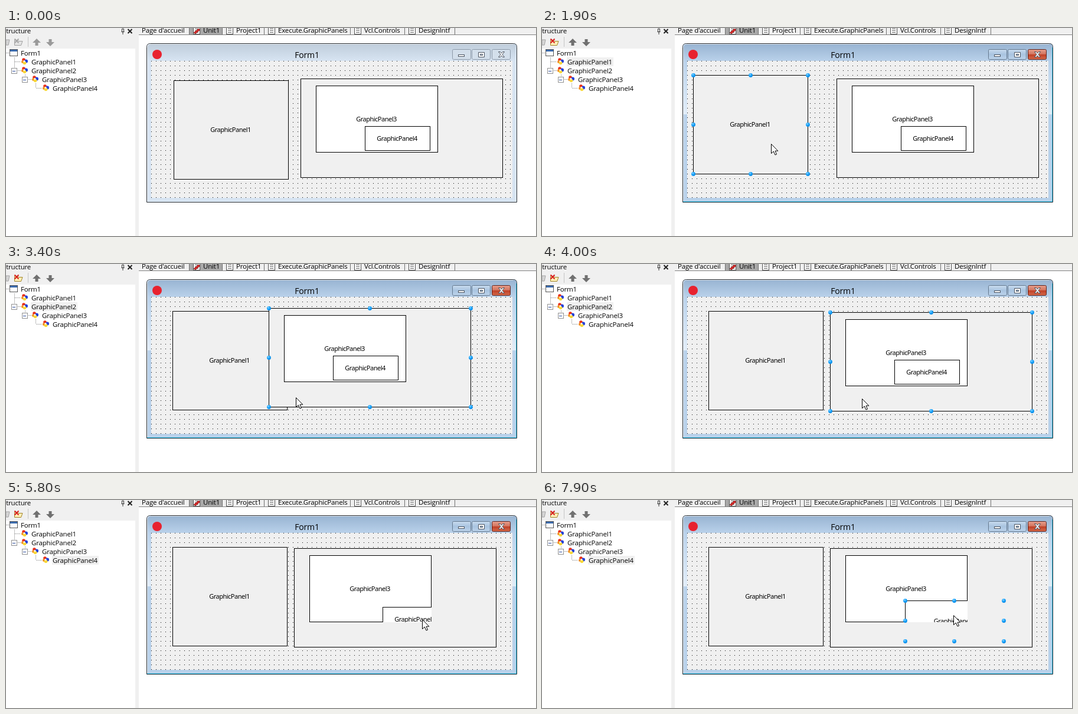
Animation, 898 px wide and 354 px high, one loop 8000 ms. Source, as an HTML page:

```html
<!DOCTYPE html>
<html lang="fr">
<head>
<meta charset="utf-8">
<title>Form designer</title>
<style>
  html, body { margin: 0; width: 100%; height: 100%; overflow: hidden; background: #fff; }
  #stage { display: block; width: 898px; height: 354px; }
  text { font: 11.5px "Open Sans", "Noto Sans", sans-serif; letter-spacing: -.17px; fill: #000; }
  .label { font: 11px "Noto Sans", "Open Sans", sans-serif; letter-spacing: -.5px; text-anchor: middle; }
  .title { font-size: 14px; letter-spacing: -.2px; text-anchor: middle; }
  .crisp { shape-rendering: crispEdges; }
  .tree { stroke: #808080; stroke-dasharray: 1 1; fill: none; }
</style>
</head>
<body>
<svg id="stage" viewBox="0 0 898 354" xmlns="http://www.w3.org/2000/svg">
  <defs>
    <linearGradient id="active" x2="0" y2="1">
      <stop offset="0" stop-color="#98b4d2"/><stop offset="1" stop-color="#b9d1ea"/>
    </linearGradient>
    <linearGradient id="idle" x2="0" y2="1">
      <stop offset="0" stop-color="#bfcddb"/><stop offset="1" stop-color="#d7e4f2"/>
    </linearGradient>
    <linearGradient id="side" x2="0" y2="1">
      <stop offset="0" stop-color="#b9d1ea"/><stop offset="1" stop-color="#e2edf8"/>
    </linearGradient>
    <linearGradient id="red" x2="0" y2="1">
      <stop offset="0" stop-color="#e8a08e"/><stop offset=".48" stop-color="#d2735d"/>
      <stop offset=".5" stop-color="#bf3f26"/><stop offset="1" stop-color="#d4694a"/>
    </linearGradient>
    <linearGradient id="blue" x2="0" y2="1">
      <stop offset="0" stop-color="#c9dcef"/><stop offset=".5" stop-color="#a9c4e0"/>
      <stop offset="1" stop-color="#bdd4ec"/>
    </linearGradient>
    <radialGradient id="ball" cx=".38" cy=".32" r=".75">
      <stop offset="0" stop-color="#8fd6ff"/><stop offset=".45" stop-color="#18a3fb"/>
      <stop offset="1" stop-color="#0584e0"/>
    </radialGradient>
    <g id="part">
      <circle cx="5" cy="3" r="2.8" fill="#e8301c"/>
      <circle cx="9" cy="5.500" r="3" fill="#2440d8"/>
      <circle cx="3.500" cy="6.500" r="2.500" fill="#f09028"/>
      <circle cx="6.500" cy="8.500" r="2.800" fill="#f8d838"/>
      <circle cx="6" cy="5.500" r="1.600" fill="#fff"/>
    </g>
    <g id="doc" class="crisp">
      <rect x=".5" y="-2.500" width="11" height="13" fill="#fff" stroke="#505050"/>
      <path d="M3 1.500h6M3 4.500h6M3 7.500h6" stroke="#606060"/>
    </g>
    <g id="plus" class="crisp">
      <rect x="-4.500" y="-4.500" width="9" height="9" fill="#fff" stroke="#919191"/>
      <path d="M-2.500 .5h5" stroke="#3050a0"/>
    </g>
  </defs>

  <!-- structure pane -->
  <g class="crisp" fill="#f0f0f0">
    <rect width="219" height="35"/>
    <rect x="219" width="6" height="354"/>
    <rect x="37" y="15" width="1" height="17" fill="#c4c4c4"/>
  </g>
  <text x="-6" y="9">Structure</text>
  <path d="M195.500 6.500h5M198 7v4M196.500 6V1.500h3V6" fill="none" stroke="#303030"/>
  <path d="M206.500 2l7 7m0-7l-7 7" stroke="#202020" stroke-width="2"/>
  <path d="M0 20h6l-2 9H0z" fill="#d6d6d6" stroke="#a2a2a2"/>
  <path id="folder" d="M14.500 20.500h5l1.500 2h7l-2.500 7h-11z"/>
  <path id="cross" d="M14.500 18.500l7 7m0-7l-7 7" stroke-width="2"/>
  <g id="arrows">
    <path d="M52 18l7 7h-4.500v5h-5v-5H45z"/>
    <path d="M75 31l7-7h-4.500v-5h-5v5H68z"/>
  </g>
  <rect id="mark" height="15" fill="#f0f0f0"/>
  <g class="crisp">
    <path class="tree" d="M0 42.500h6M14.500 50v22M15 57.500h10M18 72.500h7M32.500 79v8M36 87.500h7M50.500 94v8M51 102.500h10"/>
    <use href="#plus" x="13.500" y="72.500"/>
    <use href="#plus" x="31.500" y="87.500"/>
    <rect x="6.500" y="36.500" width="13" height="11" fill="#fff" stroke="#555"/>
    <rect x="7" y="37" width="12" height="3" fill="#3c6cae"/>
  </g>
  <g id="nodes"></g>

  <!-- editor tabs -->
  <g class="crisp">
    <rect x="225" width="673" height="11" fill="#f0f0f0"/>
    <rect x="311" width="55" height="11" fill="#a8a8a8"/>
    <rect x="225" y="11" width="673" height="1" fill="#808080"/>
  </g>
  <g id="tabs"></g>
  <path d="M318 8l8-7 3 2-8 7z" fill="#d02828" stroke="#701010" stroke-width=".6"/>

  <!-- form window -->
  <path id="frame" d="M238.500 296.500V32.500q0-6 6-6h615q6 0 6 6v264z" stroke="#22282e"/>
  <path id="top" d="M239 56V32.500q0-5.500 5.500-5.500h615q5.500 0 5.500 5.500V56z"/>
  <path id="sides" d="M239 56h7v91h-7zM858 56h7v91h-7z" fill="url(#side)"/>
  <path d="M239.500 295V32.500q0-5 5-5h615" fill="none" stroke="#fff" stroke-opacity=".75"/>
  <path id="glow" d="M864.500 33v262.500H239" fill="none"/>
  <circle cx="256" cy="45" r="8" fill="#e8222f"/>
  <text class="title" x="510" y="51">Form1</text>
  <g id="buttons"></g>
  <g fill="#fff" stroke="#4a5360">
    <rect x="766.500" y="45.500" width="10" height="3"/>
    <path d="M800.500 41.500h10v8h-10zM803.500 44.500h4v2h-4z" fill-rule="evenodd"/>
    <path d="M834.500 40.500h3l2 2.500 2-2.500h3l-3.500 4.500 3.500 4.500h-3l-2-2.500-2 2.500h-3l3.500-4.500z"/>
  </g>
  <svg x="246" y="56" width="612" height="233" viewBox="246 56 612 233" id="client">
    <rect x="246" y="56" width="612" height="233" fill="#f0f0f0"/>
  </svg>
  <g id="handles"></g>
  <path id="arrow" d="M.5 .5V16.500L4.300 13L7 19L9.500 18L7 12.200H11.800Z" fill="#fff" stroke="#000"/>
  <path id="sizer" d="M-6.500-6.500h6l-2 2 7 7 2-2v6h-6l2-2-7-7-2 2z" fill="#fff" stroke="#000"/>
</svg>
<script>
const LOOP = 8000, STEP = 100, SETTLE = 100;
const $ = id => document.getElementById(id);
const set = (el, attrs) => { for (const k in attrs) el.setAttribute(k, attrs[k]); return el; };
const show = (el, on) => set(el, { visibility: on ? 'visible' : 'hidden' });
const add = (parent, tag, attrs, text = '') => {
  const el = set(document.createElementNS('http://www.w3.org/2000/svg', tag), attrs);
  el.textContent = text;
  return parent.appendChild(el);
};

const depth = [0, 1, 1, 2, 3];
const nodeX = i => 25 + 18 * depth[i];
depth.forEach((d, i) => {
  add($('nodes'), 'text', { x: nodeX(i), y: 47 + 15 * i }, i ? 'GraphicPanel' + i : 'Form1');
  if (i) add($('nodes'), 'use', { href: '#part', x: nodeX(i) - 18, y: 36 + 15 * i });
});

const tabs = { "Page d'accueil": 230, Unit1: 334, Project1: 390, 'Execute.GraphicPanels': 461,
  'Vcl.Controls': 607, DesignIntf: 699 };
Object.entries(tabs).forEach(([name, x], i) => {
  add($('tabs'), 'text', { x, y: 8 }, name);
  if (!i) return;
  add($('tabs'), 'use', { href: '#doc', x: x - 17 });
  add($('tabs'), 'rect', { x: x - 24, width: 1, height: 11, fill: '#707070' });
});
add($('tabs'), 'rect', { x: 760, width: 1, height: 11, fill: '#707070' });

const buttons = [756.5, 789.5, 823.5].map(x =>
  add($('buttons'), 'rect', { x, y: 36.5, width: 31, height: 17, rx: 2 }));

// Designer dots, eight pixels apart
for (let y = 56.5; y < 289; y += 8)
  add($('client'), 'path', { d: `M246 ${y}h612`, stroke: '#000', 'stroke-dasharray': '1 7', class: 'crisp' });

// Nested svg elements clip children to their parent panel.
function panel(parent, fill, label) {
  const box = add(parent, 'svg', {});
  const rect = add(box, 'rect', { x: .5, y: .5, fill, stroke: '#000', class: 'crisp' });
  const text = add(box, 'text', { class: 'label' }, label);
  const place = ([x, y], [w, h]) => {
    set(box, { x, y, width: w, height: h });
    set(rect, { width: w - 1, height: h - 1 });
    set(text, { x: w / 2 - 1, y: Math.floor(h / 2) + 4 });
  };
  return { box, place };
}
const p1 = panel($('client'), '#f0f0f0', 'GraphicPanel1');
const p2 = panel($('client'), '#f0f0f0', '');
const p3 = panel(p2.box, '#fff', 'GraphicPanel3');
const p4 = panel(p3.box, '#fff', 'GraphicPanel4');
const balls = Array.from({ length: 8 }, () => add($('handles'), 'circle', { r: 3.4, fill: 'url(#ball)' }));

// Pointer strokes: start, end, destination. Each one slows down as it arrives.
const strokes = [
  [100, 200, 865, 122], [200, 1000, 426, 181], [1000, 1300, 416, 206],
  [1400, 1700, 378, 188], [1700, 1800, 388, 197], [1900, 2000, 414, 197],
  [2300, 2700, 545, 238], [2800, 3200, 491, 227],
  [3400, 3600, 521, 221], [3600, 3800, 534, 234], [3900, 4000, 542, 229],
  [4000, 4600, 678, 201], [4700, 5100, 664, 184],
  [5200, 5600, 733, 217], [5700, 6000, 682, 192],
  [6200, 6600, 726, 214], [6800, 7200, 783, 242], [7500, 7900, 697, 196]
];
const clicks = [{ n: 1, t: 1000 }, { n: 2, t: 2700 }, { n: 4, t: 4600 }];
const drags = [
  { what: 'p1', press: 1400, drop: 1800 }, { what: 'p1', press: 1900, drop: 2000 },
  { what: 'p2', press: 2800, drop: 3200 }, { what: 'p2', press: 3400, drop: 3800 },
  { what: 'p4', press: 5200, drop: 6000 }, { what: 'size', press: 6800, drop: 7200 }
];

const easeOut = k => 1 - (1 - k) ** 2;
const plus = (a, b) => [a[0] + b[0], a[1] + b[1]];

function pointer(t) {
  let pos = strokes[0].slice(2);
  for (const [from, to, x, y] of strokes) {
    if (t <= from) break;
    const k = easeOut(Math.min(1, (t - from) / (to - from)));
    pos = [pos[0] + (x - pos[0]) * k, pos[1] + (y - pos[1]) * k];
  }
  return pos.map(Math.round);
}

// A dragged thing follows the pointer between press and drop.
function dragged(what, base, t) {
  return drags.filter(d => d.what === what && t > d.press).reduce((pos, d) => {
    const a = pointer(d.press), b = pointer(Math.min(t, d.drop));
    return [pos[0] + b[0] - a[0], pos[1] + b[1] - a[1]];
  }, base);
}

function drawFocus(on) {
  set($('frame'), { fill: on ? '#b9d1ea' : '#d7e4f2' });
  set($('top'), { fill: on ? 'url(#active)' : 'url(#idle)' });
  show($('sides'), on);
  set($('glow'), { stroke: on ? '#36c6ec' : '#e6f0fa' });
  buttons.forEach((b, i) => set(b, {
    fill: on ? (i < 2 ? 'url(#blue)' : 'url(#red)') : '#d3dfeb',
    stroke: on ? (i < 2 ? '#64788e' : '#5c2420') : '#8c99a8'
  }));
  set($('arrows'), { fill: on ? '#707070' : '#9a9a9a' });
}

function drawHandles([x, y], [w, h]) {
  balls.forEach((ball, i) => {
    const n = i < 4 ? i : i + 1;
    set(ball, {
      cx: x + .5 + Math.floor((w - 1) * (n % 3) / 2),
      cy: y + .5 + Math.floor((h - 1) * Math.floor(n / 3) / 2)
    });
  });
}

function draw(t) {
  const sel = clicks.reduce((n, c) => t >= c.t ? c.n : n, 0);
  drawFocus(t >= 900);
  set($('folder'), { fill: sel ? '#fff0b8' : '#e4e4e4', stroke: sel ? '#a08428' : '#a0a0a0' });
  set($('cross'), { stroke: sel ? '#d82020' : '#a8a8a8' });
  show($('mark'), sel);
  if (sel) set($('mark'), { x: nodeX(sel) - 1, y: 35 + 15 * sel, width: 79 });

  const at1 = dragged('p1', [284, 89], t), at2 = dragged('p2', [499, 86], t);
  const at3 = [26, 12], at4 = dragged('p4', [83, 69], t);
  const size1 = [195, 169], size2 = [343, 169], size4 = dragged('size', [111, 42], t);
  p1.place(at1, size1);
  p2.place(at2, size2);
  p3.place(at3, [207, 114]);
  p4.place(at4, size4);

  const busy = drags.some(d => t > d.press && t < d.drop + SETTLE);
  show($('handles'), sel && !busy);
  if (sel === 1) drawHandles(at1, size1);
  else if (sel === 2) drawHandles(at2, size2);
  else drawHandles(plus(plus(at2, at3), at4), size4);

  const sizing = t >= 6600 && t < 7600;
  show($('arrow'), t >= 200 && !sizing);
  show($('sizer'), sizing);
  set($(sizing ? 'sizer' : 'arrow'), { transform: `translate(${pointer(t).join(' ')})` });
}

const start = performance.now();
function tick(now) {
  const t = Math.max(0, now - start) % LOOP;
  draw(Math.floor(t / STEP) * STEP);
  requestAnimationFrame(tick);
}
draw(0);
requestAnimationFrame(tick);
</script>
</body>
</html>
```
